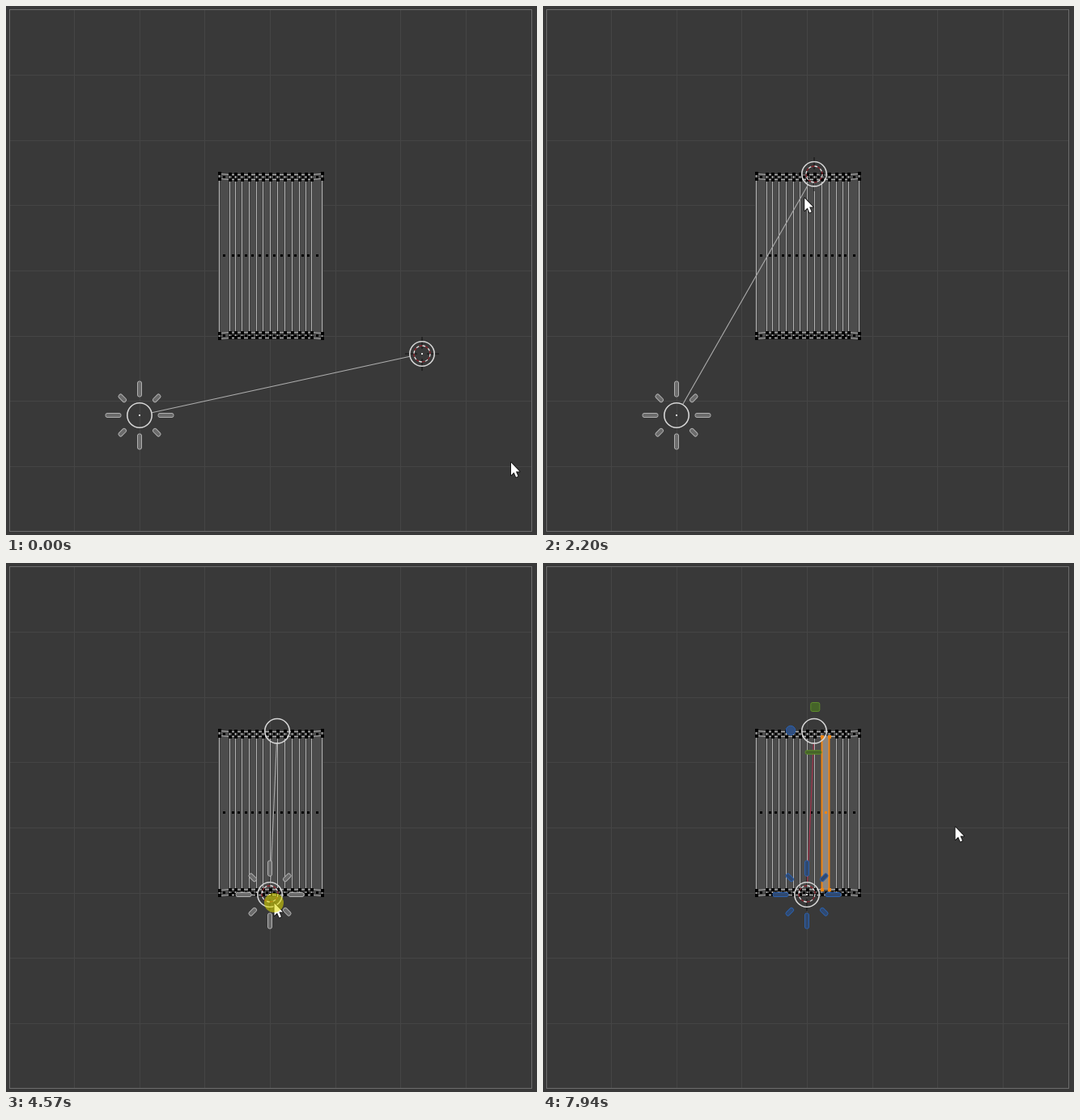
Animation of 656 by 654 pixels, one loop 8 s. Source, as an HTML page with a canvas:

```html
<!DOCTYPE html>
<html lang="en">
<head>
<meta charset="utf-8">
<title>Viewport gizmo</title>
<style>
html, body { margin: 0; width: 100%; height: 100%; overflow: hidden; background: #393939; }
canvas { display: block; }
</style>
</head>
<body>
<canvas id="view" width="656" height="654"></canvas>
<script>
const ctx = document.getElementById('view').getContext('2d');
const LOOP = 8000, STEP = 80, SELECT_AT = 6530, GIZMO_AT = 7380;
const within = (t, a, b) => t >= a && t < b;
const snap = v => Math.floor(v) + 0.5;
const ease = p => p * p * (3 - 2 * p);

// A track is a starting point followed by moves: first step, last step, x, y.
function track([startX, startY], ...moves) {
  return t => {
    let x = startX, y = startY;
    for (const [first, last, toX, toY] of moves) {
      if (t < first) break;
      const elapsed = (Math.floor((t - first) / STEP) + 1) * STEP;
      const p = ease(Math.min(1, elapsed / (last - first + STEP / 2)));
      x += (toX - x) * p;
      y += (toY - y) * p;
    }
    return [x, y];
  };
}

const pointerAt = track([623.5, 564],
  [240, 560, 519, 432], [790, 1350, 327, 201], [1890, 1970, 340, 208],
  [2120, 2920, 158, 513], [3160, 3790, 324, 421], [3950, 4030, 341, 421],
  [4330, 4570, 331, 420], [4870, 5270, 433, 432], [5500, 5740, 518.5, 298],
  [6060, 6450, 352, 305], [6760, 7080, 541, 332], [7780, 7940, 509, 326]);
const endAt = track([514, 430], [790, 1350, 322, 204], [2120, 2120, 335, 207.7]);
const sunAt = track([165, 506],
  [3160, 3790, 318, 410], [3950, 4030, 335, 410], [4330, 4570, 326, 410]);
const crossAt = track([514, 430],
  [790, 1350, 322, 204], [1890, 1890, 335, 208], [3160, 3790, 326, 409]);

function line(x1, y1, x2, y2, color, width = 1) {
  ctx.strokeStyle = color;
  ctx.lineWidth = width;
  ctx.beginPath();
  ctx.moveTo(x1, y1);
  ctx.lineTo(x2, y2);
  ctx.stroke();
}

function disc(x, y, r, fill, stroke, width = 1) {
  ctx.beginPath();
  ctx.arc(x, y, r, 0, 2 * Math.PI);
  if (fill) { ctx.fillStyle = fill; ctx.fill(); }
  if (stroke) { ctx.strokeStyle = stroke; ctx.lineWidth = width; ctx.stroke(); }
}

function pill(x, y, w, h, fill, stroke) {
  ctx.beginPath();
  ctx.roundRect(x - w / 2, y - h / 2, w, h, 2);
  ctx.fillStyle = fill;
  ctx.fill();
  ctx.strokeStyle = stroke;
  ctx.lineWidth = 1;
  ctx.stroke();
}

function dot(x, y, size, color = '#000') {
  ctx.fillStyle = color;
  ctx.fillRect(Math.round(x - size / 2), Math.round(y - size / 2), size, size);
}

function drawGrid() {
  ctx.fillStyle = '#393939';
  ctx.fillRect(0, 0, 656, 654);
  for (let i = 1; i < 8; i++) {
    const x = snap(4 + 80.65 * i), y = snap(4.7 + 80.7 * i);
    line(x, 5, x, 649, '#454545');
    line(5, y, 649, y, '#454545');
  }
  ctx.strokeStyle = '#6c6c6c';
  ctx.strokeRect(4.5, 4.5, 645, 645);
}

// Edges of a shallow arc seen from the front, with a wider panel on each side.
const SIDES = 7, MID_X = 326.95, MID_Y = 309.2;
const columnX = k => MID_X + (Math.abs(k) === SIDES ? Math.sign(k) * 63.6 : 86 * Math.sin(k * 0.105));

function drawMesh() {
  const edge = '#b2b2b2';
  ctx.fillStyle = '#4c4c4c';
  ctx.fillRect(263, 207, 128, 204);
  for (let k = -SIDES; k <= SIDES; k++) {
    const x = snap(columnX(k));
    line(x, 208, x, 410, '#444', 3);
    line(x, 208, x, 410, edge);
  }
  for (const side of [-1, 1]) {
    for (const rim of [94.5, 101]) {
      const rowY = k => MID_Y + side * (rim + (Math.abs(k) === SIDES ? 0.8 : 0));
      for (let k = -SIDES; k < SIDES; k++)
        line(columnX(k), snap(rowY(k)), columnX(k + 1), snap(rowY(k + 1)), edge);
      for (let k = -SIDES; k <= SIDES; k++) dot(snap(columnX(k)), rowY(k), 4);
    }
  }
  for (let k = -SIDES; k < SIDES; k++) {
    const x = (columnX(k) + columnX(k + 1)) / 2;
    for (const y of [211, 308.5, 407]) dot(x, y, 3);
  }
}

function drawSelection() {
  const orange = '#f08512', left = snap(columnX(2)), right = snap(columnX(3));
  ctx.fillStyle = '#8d8781';
  ctx.fillRect(left, 214, right - left, 190);
  for (const x of [left, right]) {
    line(x, 214, x, 404, orange, 2);
    for (const y of [215, 404]) dot(x, y, 4, orange);
  }
  dot((left + right) / 2, 308.5, 3, orange);
}

function drawCross([x, y]) {
  for (let i = 0; i < 4; i++) {
    const dx = Math.round(Math.cos(i * Math.PI / 2)), dy = Math.round(Math.sin(i * Math.PI / 2));
    line(x + dx * 6, y + dy * 6, x + dx * 21, y + dy * 21, '#111');
  }
  const dash = 2 * Math.PI * 10 / 16;
  ctx.setLineDash([dash, dash]);
  disc(x, y, 10, null, '#e4e4e4', 1.3);
  ctx.lineDashOffset = dash;
  disc(x, y, 10, null, '#8e2730', 1.3);
  ctx.lineDashOffset = 0;
  ctx.setLineDash([]);
}

function drawHandle([x, y], hot) {
  disc(x, y, 15.2, null, hot ? '#fff' : '#d6d6d6', hot ? 2 : 1.6);
}

function drawSun(center, hot, colored) {
  const fill = colored ? '#30496f' : '#6b6b6b';
  const stroke = colored ? '#2b60ad' : '#b0b0b0';
  for (let i = 0; i < 8; i++) {
    const diagonal = i % 2;
    ctx.save();
    ctx.translate(...center);
    ctx.rotate(i * Math.PI / 4);
    pill(diagonal ? 30 : 32.5, 0, diagonal ? 11 : 19, 5, fill, stroke);
    ctx.restore();
  }
  drawHandle(center, hot);
  dot(...center, 2, '#ddd');
}

function drawLink([x1, y1], [x2, y2], color) {
  const d = Math.hypot(x2 - x1, y2 - y1);
  const ux = (x2 - x1) / d * 15.5, uy = (y2 - y1) / d * 15.5;
  line(x1 + ux, y1 + uy, x2 - ux, y2 - uy, color, 1.1);
}

function drawGizmo() {
  const green = '#456329', rim = '#5d8c2b';
  pill(336.3, 178, 11, 11, green, rim);
  pill(334, 234, 20, 4.5, green, rim);
  disc(306, 207, 5.8, '#304f80', '#2b60ad');
}

const arrow = new Path2D('M.5 .5V16L4 12.6 6.6 18.4 9 17.3 6.4 11.6H11Z');

function drawPointer([x, y]) {
  ctx.save();
  ctx.translate(x, y);
  ctx.lineJoin = 'round';
  ctx.strokeStyle = '#111';
  ctx.lineWidth = 1.8;
  ctx.stroke(arrow);
  ctx.fillStyle = '#fff';
  ctx.fill(arrow);
  ctx.restore();
}

function render(t) {
  const end = endAt(t), sun = sunAt(t), pointer = pointerAt(t);
  const gizmo = t >= GIZMO_AT;
  const pressed = within(t, 790, 2120) || within(t, 3000, 4720) || within(t, SELECT_AT, SELECT_AT + STEP);
  drawGrid();
  drawMesh();
  if (t >= SELECT_AT) drawSelection();
  drawCross(crossAt(t));
  drawLink(sun, end, gizmo ? '#a92f49' : '#adadad');
  drawSun(sun, within(t, 2840, 3160), gizmo);
  drawHandle(end, within(t, 480, 790));
  if (t < 790) dot(...end, 2, '#ddd');
  if (gizmo) drawGizmo();
  drawPointer(pointer);
  if (pressed) disc(...pointer, 12, 'rgba(225,221,0,.56)');
}

const began = performance.now();
function tick() {
  render((performance.now() - began) % LOOP);
  requestAnimationFrame(tick);
}
tick();
</script>
</body>
</html>
```
